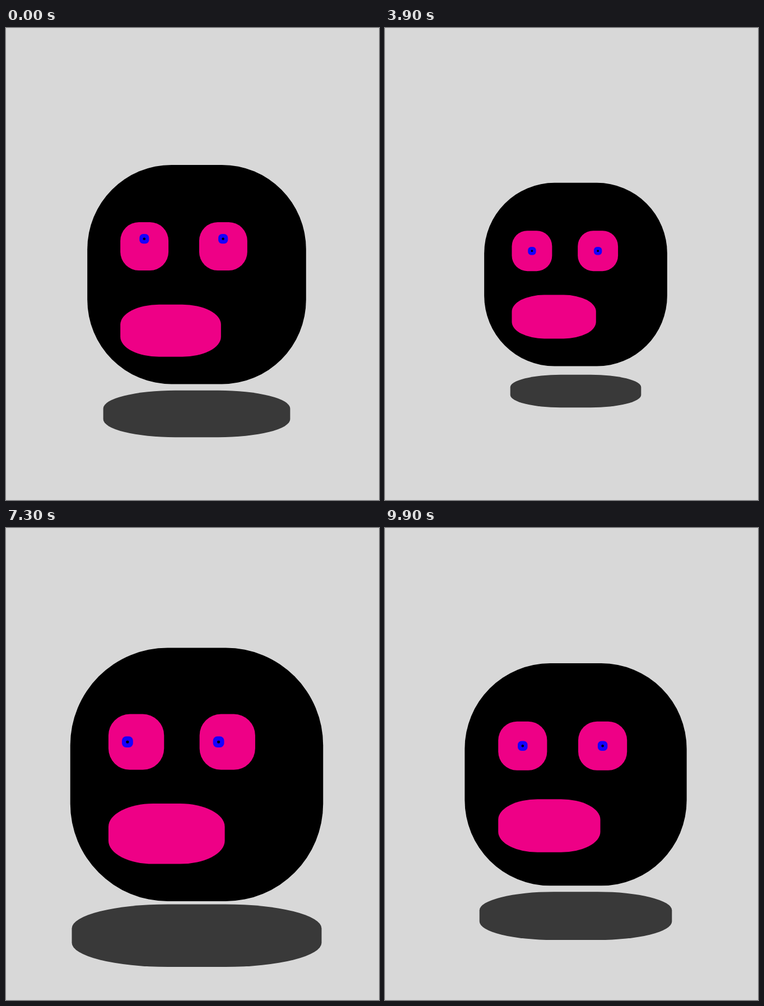
Recreate the animation shown at these times as an HTML page with a canvas. Size 666 by 841 pixels, loop 10000 ms.

```html
<!DOCTYPE html>
<html lang="en">
<head>
<meta charset="utf-8">
<title>Floating head</title>
<style>
html, body { margin: 0; width: 100%; height: 100%; overflow: hidden; background: #d8d8d8; }
canvas { display: block; }
</style>
</head>
<body>
<canvas width="666" height="841"></canvas>
<script>
const ctx = document.querySelector('canvas').getContext('2d');
const LOOP = 10000, STEP = 100, SIZE = 457.14, ROUND = .385, GLANCE = .158;
const PINK = '#ee0086', BLUE = '#1600ff', BLACK = '#000';

// cubic-bezier(.25, .1, .25, 1), clamped to 0..1
function ease(x) {
  if (x <= 0) return 0;
  if (x >= 1) return 1;
  const curve = (a, b, p) => 3 * a * p * (1 - p) ** 2 + 3 * b * p * p * (1 - p) + p ** 3;
  let lo = 0, hi = 1;
  for (let i = 0; i < 24; i++) {
    const mid = (lo + hi) / 2;
    if (curve(.25, .25, mid) < x) lo = mid; else hi = mid;
  }
  return curve(.1, 1, lo);
}

// Eases from 0 to 1, holds, and eases back to 0.
function pulse(t, start, rise, fall = rise, hold = 0) {
  return ease((t - start) / rise) - ease((t - start - rise - hold) / fall);
}

function blob(color, x, y, w, h = w) {
  ctx.fillStyle = color;
  ctx.beginPath();
  ctx.roundRect(x, y, w, h, { x: w * ROUND, y: h * ROUND });
  ctx.fill();
}

function drawEye(x, y, size, dx, dy, lid) {
  ctx.save();
  ctx.translate(x, y);
  ctx.scale(size, size);
  blob(PINK, 0, 0, 1);
  blob(BLUE, .4 + dx, .4 + dy, .2);
  blob(BLACK, .475 + dx, .475 + dy, .05);
  if (lid) {
    ctx.fillRect(-.01, -.01, 1.02, lid + .01);
    ctx.fillRect(-.01, 1 - lid, 1.02, lid + .01);
  }
  ctx.restore();
}

function draw(t) {
  const breath = .7 + .3 * pulse((t + 6430) % LOOP, 0, 5000);
  const scale = SIZE * breath;

  const m = (t + 80) % 3000;
  const drop = pulse(m, 0, 350, 550) + pulse(m, 1310, 1070, 400);

  // The pupils rest at the left, glance up, then jump above the eyes and return.
  const g = (t + 1450) % 6000;
  const up = pulse(g, 0, 1400);
  const dx = -GLANCE * (1 - up - pulse(g, 2800, 1100, 600, 1500));
  const dy = -GLANCE * up - 1.232 * pulse(g, 2800, 1100, 1000, 360);
  const lid = .5 * pulse(t, 4650, 250);

  ctx.fillStyle = '#d8d8d8';
  ctx.fillRect(0, 0, 666, 841);
  ctx.save();
  ctx.translate(340.5 - scale / 2, 439.2 - scale / 2);
  ctx.scale(scale, scale);
  blob('#393939', .5 - breath / 2, 1.1357 - breath / 8, breath, breath / 4);
  blob(BLACK, 0, 0, 1);
  for (const x of [.151, .5113]) drawEye(x, .2615, .22, dx, dy, lid);
  blob(PINK, .151, .6114 + drop * .0714, .46, .238);
  ctx.restore();
}

const start = performance.now();
function tick() {
  const t = (performance.now() - start) % LOOP;
  draw(Math.floor(t / STEP) * STEP);
  requestAnimationFrame(tick);
}
tick();
</script>
</body>
</html>
```
